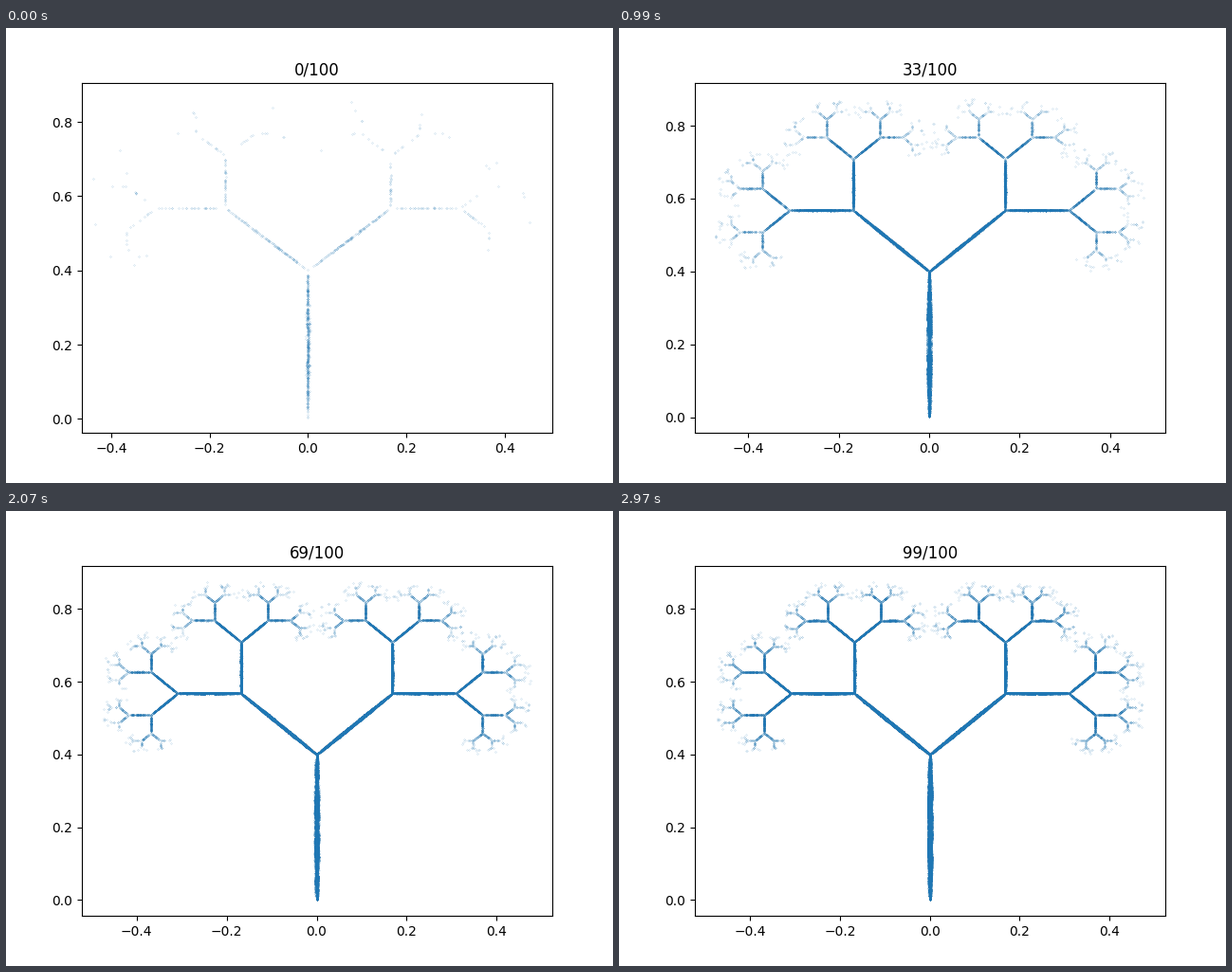
A matplotlib script for the animation above (3000 ms loop, 640 by 480 pixels).

```python
import random

import matplotlib.pyplot as plt
import numpy as np
from matplotlib.animation import FuncAnimation

FRAMES = 100
BATCH = 1000
MARGIN = 0.05

# Extent of the cloud at the start and end: left, right, bottom, top
START = np.array([-0.416, 0.4535, 0.005, 0.863])
FULL = np.array([-0.4755, 0.4765, 0.0, 0.8755])


def shrink(x, y, scale, base):
    """Squash the whole tree into the trunk."""
    return 0.01 * scale * x, 0.45 * scale * y + base


def branch(x, y, side):
    """Copy the whole tree onto a branch turned by 45 degrees."""
    return 0.42 * (x + side * y), 0.42 * (y - side * x) + 0.4


RULES = [
    lambda x, y: shrink(x, y, 1, 0),
    lambda x, y: shrink(x, y, -1, 0.4),
    lambda x, y: branch(x, y, -1),
    lambda x, y: branch(x, y, 1),
]


def chaos_game(count, warmup=20, seed=7):
    rng = random.Random(seed)
    x = y = 0.0
    path = []
    for _ in range(warmup + count):
        x, y = rng.choice(RULES)(x, y)
        path.append((x, y))
    return np.array(path[warmup:])


def extent(frame):
    """The extent closes in on its full size as points arrive."""
    gap = (frame + 1) ** -0.6 * (1 - frame / (FRAMES - 1))
    return FULL + (START - FULL) * gap


def padded(lo, hi):
    pad = MARGIN * (hi - lo)
    return lo - pad, hi + pad


points = chaos_game(FRAMES * BATCH)

fig, ax = plt.subplots(figsize=(6.4, 4.8), dpi=100)
dots = ax.scatter([], [], s=0.01, color="C0")
title = ax.set_title("")


def update(frame):
    left, right, bottom, top = extent(frame)
    ax.set_xlim(padded(left, right))
    ax.set_ylim(padded(bottom, top))
    dots.set_offsets(points[:(frame + 1) * BATCH])
    title.set_text(f"{frame}/{FRAMES}")
    return dots, title


anim = FuncAnimation(fig, update, frames=FRAMES, interval=30,
                     repeat=True, repeat_delay=0, blit=False)
plt.show()
```
